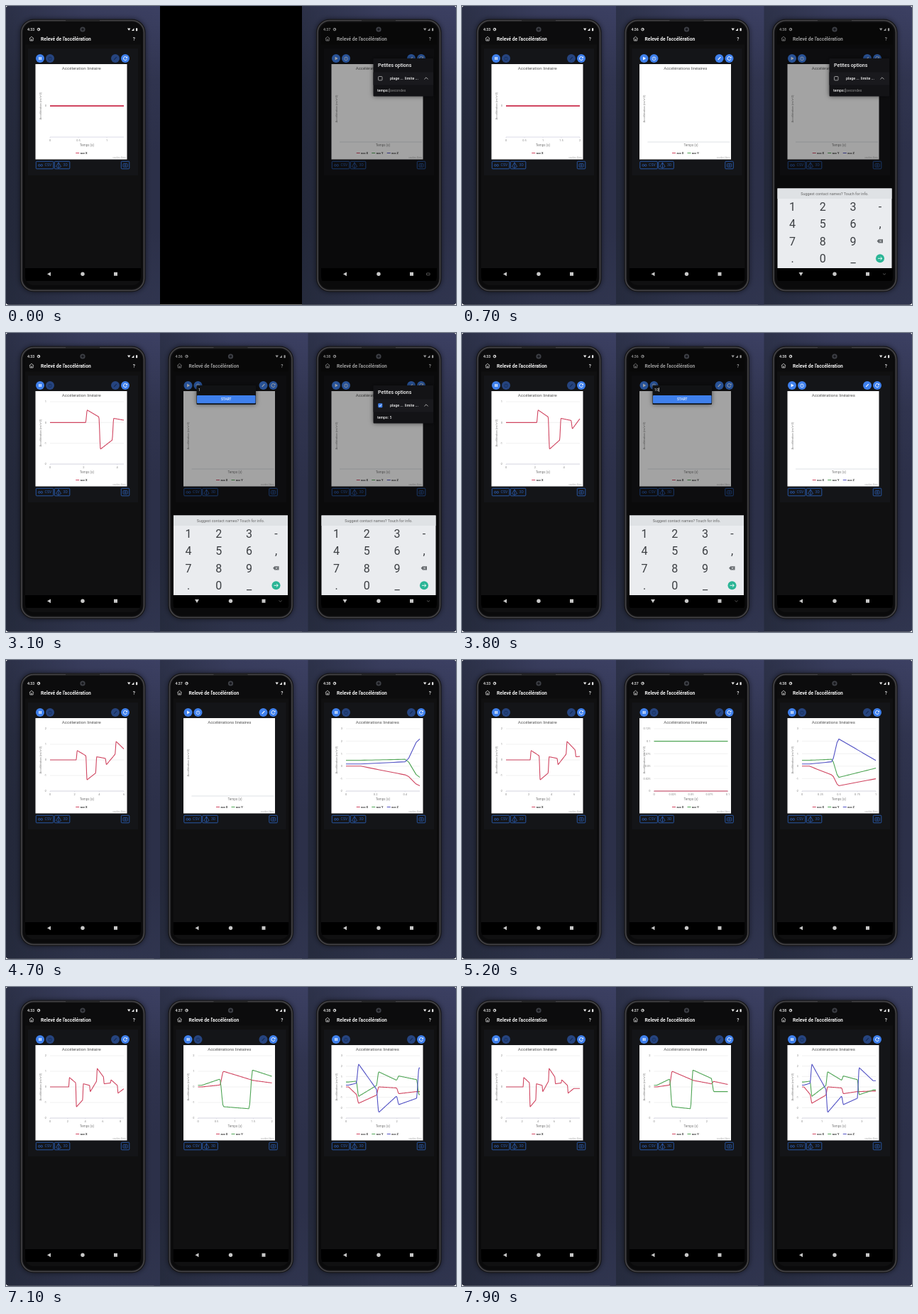
Write an HTML page with a canvas that moves like this. It is 634 by 422 pixels and loops after 8 s.

```html
<!DOCTYPE html>
<html lang="fr">
<head>
<meta charset="utf-8">
<title>Relevé de l'accélération</title>
<style>
html, body { margin: 0; width: 100%; height: 100%; overflow: hidden; background: #fff; }
canvas { display: block; width: 634px; height: 422px; }
</style>
</head>
<body>
<canvas id="stage"></canvas>
<script>
const W = 634, H = 422, LOOP = 8000, STEP = 100;
const FONT = 'Roboto, "Open Sans", sans-serif';
const RED = '#d04560', GREEN = '#4fa555', BLUE = '#5050c4', ACCENT = '#3f80ec';
const PLOT = { x: 62, y: 97, w: 104, h: 88 };
const BEAT = .79, JUMP = .1;
const dpr = window.devicePixelRatio || 1;
const canvas = document.getElementById('stage');
canvas.width = W * dpr;
canvas.height = H * dpr;
const g = canvas.getContext('2d');

// The phone is shaken once per beat: the value jumps to the first number, then drifts to the second
const axis = (name, color, first, ...swings) => ({ name, color, first, swings });
const solo = [
  axis('acc X', RED, 2.12, [0, 0], [.6, .27], [-1.28, -.85], [.2, .1], [-.3, .35], [1.18, .65], [.2, .25], [.45, .1], [-.4, -.1])
];
const duo = [
  axis('acc X', RED, .59, [0, .12], [1, .5], [.42, .2], [.35, .1]),
  axis('acc Y', GREEN, .59, [.1, .5], [-1.27, -1.4], [1.08, .55], [-.3, -.3])
];
const trio = [
  axis('acc X', RED, .4, [0, -.7], [-1.57, -.8], [0, -.1], [-.65, -.45], [-.45, -.4]),
  axis('acc Y', GREEN, .4, [.47, .55], [-.9, .12], [1.45, .65], [1.05, .7], [-.75, -.3]),
  axis('acc Z', BLUE, .4, [.17, .35], [2.18, -.2], [-2.45, -.9], [-1.7, -1.1], [1.85, .6])
];

const clamp = v => Math.max(0, Math.min(1, v));
const mix = (a, b, k) => a + (b - a) * k;
const smooth = k => k * k * (3 - 2 * k);

function valueAt({ first, swings }, u) {
  const i = Math.min(swings.length - 1, Math.max(0, Math.floor((u - first) / BEAT) + 1));
  const since = i ? u - first - (i - 1) * BEAT : u;
  const [from, to] = swings[i];
  if (since < JUMP) return i ? mix(swings[i - 1][1], from, smooth(since / JUMP)) : from;
  return mix(from, to, clamp((since - JUMP) / ((i ? BEAT : first) - JUMP)));
}

function recorded(series, u) {
  const out = [];
  for (let v = 0; v < u; v += .025) out.push([v, valueAt(series, v)]);
  out.push([u, valueAt(series, u)]);
  return out;
}

// Halve or double a decimal unit until about four steps fit
function niceStep(span) {
  const unit = span < .95 ? .1 : 1;
  return unit * 2 ** Math.ceil(Math.log2(span / unit / 4) - 1e-6);
}

function valueRange(lines) {
  const vals = lines.flat().map(p => p[1]);
  const min = Math.min(...vals), max = Math.max(...vals), span = max - min;
  if (!span) return { lo: -1, hi: 1, step: 1, flat: true };
  const step = span > 1.5 ? 1 : niceStep(span);
  const pad = span * .05;
  return {
    lo: min === 0 ? 0 : Math.floor((min - pad) / step) * step,
    hi: Math.ceil((max + pad) / step) * step, step
  };
}

function text(str, x, y, size, color, align = 'left', weight = 400) {
  g.font = `${weight} ${size}px ${FONT}`;
  g.textAlign = align;
  g.textBaseline = 'middle';
  g.fillStyle = color;
  g.fillText(str, x, y + size * .06);
}

function box(x, y, w, h, fill, r = 0, stroke, lw = 1) {
  g.beginPath();
  g.roundRect(x, y, w, h, r);
  if (fill) { g.fillStyle = fill; g.fill(); }
  if (stroke) { g.strokeStyle = stroke; g.lineWidth = lw; g.stroke(); }
}

function disc(x, y, r, fill) {
  g.beginPath();
  g.arc(x, y, r, 0, 7);
  g.fillStyle = fill;
  g.fill();
}

function trace(pts) {
  g.beginPath();
  for (let i = 0; i < pts.length; i += 2) g.lineTo(pts[i], pts[i + 1]);
}

function poly(pts, fill) {
  trace(pts);
  g.fillStyle = fill;
  g.fill();
}

function line(pts, color, lw = 1) {
  trace(pts);
  g.strokeStyle = color;
  g.lineWidth = lw;
  g.lineJoin = 'round';
  g.stroke();
}

function arc(x, y, r, from, to, color, lw = .8) {
  g.beginPath();
  g.arc(x, y, r, from, to);
  g.strokeStyle = color;
  g.lineWidth = lw;
  g.stroke();
}

const label = v => String(+v.toFixed(3));

function chart(series, u) {
  box(41.5, 82, 129, 134.5, '#fff');
  const plural = series.length > 1;
  text(plural ? 'Accélérations linéaires' : 'Accéleration linéaire', 106.3, 88.3, 6.1, '#555', 'center');
  const { x, y, w, h } = PLOT, base = y + h;
  g.save();
  g.translate(48.5, u > 0 ? 141 : 145);
  g.rotate(-Math.PI / 2);
  text('Accélération (m/s^2)', 0, 0, 4.2, '#777', 'center');
  g.restore();
  text('Temps (s)', 114, 196.5, 4.5, '#777', 'center');

  if (u > 0) {
    const lines = series.map(s => recorded(s, u));
    const r = valueRange(lines);
    const py = v => base - (v - r.lo) / (r.hi - r.lo) * h;
    for (let i = 0, n = Math.round((r.hi - r.lo) / r.step); i <= n; i++) {
      const v = r.lo + i * r.step;
      if (r.flat && i !== 1) continue;
      line([x, py(v), x + w, py(v)], '#e8e8e8', .6);
      text(label(v), x - 5, py(v), 4, '#888', 'right');
    }
    line([x, base, x + w, base], '#ccd', .7);
    const step = Math.min(2, niceStep(u));
    for (let v = 0; v <= u + 1e-6; v += step) {
      const tx = x + v / u * w;
      line([tx, base, tx, base + 1.5], '#ccd', .5);
      text(label(v), tx, 190, 4, '#888', 'center');
    }
    lines.forEach((pts, i) =>
      line(pts.flatMap(([s, v]) => [x + s / u * w, py(v)]), series[i].color, r.flat ? 1.8 : 1.1));
  } else {
    line([53, 192, 169, 192], '#d0d4dc', .7);
  }

  let lx = 107 - (21.5 * series.length - 4) / 2;
  for (const s of series) {
    line([lx, 207.5, lx + 5, 207.5], s.color, 1.2);
    text(s.name, lx + 6.5, 207.5, 4, '#333', 'left', 700);
    lx += 21.5;
  }
  text('courbes libres', 169, 213.6, 3, '#aaa', 'right');
}

function toolbar(running) {
  const dim = '#26447f', ink = running ? '#142a54' : '#fff';
  [48, 62, 154, 168].forEach((x, i) =>
    disc(x, 74, 6, running && i % 3 ? dim : ACCENT));
  if (running) {
    box(46.3, 72, 1.3, 4, '#fff');
    box(48.6, 72, 1.3, 4, '#fff');
  } else {
    poly([46.6, 71.6, 50.6, 74, 46.6, 76.4], '#fff');
  }
  arc(62, 74.3, 2.4, 0, 7, ink, .7);
  line([62, 74.5, 62, 72.5], ink, .6);
  line([152.2, 75.8, 155.8, 72.2], ink, 1.2);
  arc(168, 74, 2.5, .3, 5.4, '#fff', .9);
  poly([168.6, 73.4, 171, 73.4, 171, 71], '#fff');
}

function exportRow() {
  const c = '#2b5eb4';
  box(42.3, 219.3, 24.5, 10.5, null, 1, c, .9);
  box(68.3, 219.3, 21.5, 10.5, null, 1, c, .9);
  box(162.3, 219.3, 11.5, 10.5, null, 1, c, .9);
  arc(46.8, 224.8, 1.4, 0, 7, c);
  arc(50.2, 224.8, 1.4, 0, 7, c);
  text('CSV', 54.5, 224.5, 5.2, c);
  line([74, 220.8, 77.6, 226.6, 74, 228.6, 70.4, 226.6, 74, 220.8], c, .8);
  line([74, 221, 74, 228], c, .8);
  text('3D', 80.5, 224.5, 5.2, c);
  box(165, 222.6, 6.2, 4.6, null, .8, c, .8);
  arc(168.1, 224.9, 1.1, 0, 7, c, .7);
}

function header(clock) {
  box(27, 24, 163, 30.5, '#0c0c0d');
  text(clock, 30, 33, 5.2, '#eee', 'left', 500);
  arc(46, 33, 1.8, 0, 7, '#ddd', 1);
  disc(46.6, 32.6, .9, '#ddd');
  poly([171, 31.5, 175.4, 31.5, 173.2, 34.8], '#eee');
  poly([177, 35, 180.4, 35, 180.4, 31.2], '#eee');
  box(183, 31.2, 2.2, 4, '#eee', .4);
  line([32.8, 46, 36, 43.2, 39.2, 46], '#ccc', .8);
  line([33.8, 45.4, 33.8, 49, 38.2, 49, 38.2, 45.4], '#ccc', .8);
  box(35.4, 46.6, 1.2, 2.2, '#ccc');
  text("Relevé de l'accélération", 49, 46.5, 6.7, '#f2f2f2', 'left', 700);
  text('?', 180.3, 46.5, 6.5, '#eee', 'center', 500);
}

function navBar(keys, typing) {
  box(27, 370, 163, 18, '#000');
  if (keys) poly([57.5, 376, 63.5, 376, 60.5, 381], '#c8c8c8');
  else poly([58, 378.3, 63, 375.4, 63, 381.2], '#c8c8c8');
  disc(108, 378.3, 2.7, '#c8c8c8');
  box(152, 375.8, 5, 5, '#c8c8c8');
  if (typing) {
    if (keys) line([176, 377.5, 178, 379.3, 180, 377.5], '#777', .7);
    else box(175.5, 377, 4.6, 2.8, null, .4, '#777', .7);
  }
}

function keyboard(ready) {
  box(27.5, 257.5, 161, 113, ready ? '#eaecef' : '#343434');
  if (!ready) return;
  box(27.5, 257.5, 161, 14.5, '#dfe2e5');
  text('Suggest contact names? Touch for info.', 108, 265, 5.4, '#666', 'center');
  ['123-', '456,', '789', '.0_'].forEach((row, j) =>
    [...row].forEach((ch, i) =>
      text(ch, Math.min(172, 48.5 + i * 42.8), 283 + j * 24.6, 16, '#3c3f43', 'center')));
  poly([167.6, 331.8, 170, 329.2, 176, 329.2, 176, 334.4, 170, 334.4], '#666a6e');
  line([171.2, 330.5, 174, 333.1], '#eaecef', .7);
  line([174, 330.5, 171.2, 333.1], '#eaecef', .7);
  disc(172, 356.3, 6, '#2bb596');
  line([169, 356.3, 174.6, 356.3], '#fff', .9);
  line([172.6, 354.2, 174.8, 356.3, 172.6, 358.4], '#fff', .9);
}

function shadowed(draw, blur = 6) {
  g.save();
  g.shadowColor = 'rgba(0,0,0,.55)';
  g.shadowBlur = blur * dpr;
  draw();
  g.restore();
}

function timerDialog(value, cursor) {
  shadowed(() => box(60, 74, 83.5, 27, '#111214', 1));
  if (value) text(value, 62.5, 80, 5.2, '#eee');
  else text('secondes', 63.3, 80, 5.2, '#8a8a8a');
  if (cursor) box(62 + (value ? 6.8 : 0), 77, .7, 6, '#ddd');
  box(60.5, 88, 82.5, 11.3, ACCENT, 1);
  text('START', 101.7, 93.7, 4.8, '#e8f0ff', 'center', 500);
}

function optionsDialog(value, checked) {
  shadowed(() => box(100.5, 74, 84.5, 53.5, '#131316', 1));
  text('Petites options', 107, 84, 7, '#f4f4f4', 'left', 500);
  box(100.5, 93.5, 84.5, 18, '#19191d');
  if (checked) {
    box(107.3, 99.2, 6, 6, ACCENT, 1);
    line([108.6, 102.3, 109.8, 103.6, 112, 100.8], '#fff', .9);
  } else {
    box(107.6, 99.5, 5.4, 5.4, null, .8, '#aaa', .9);
  }
  text('plage ...', 124, 102, 5.3, '#eee', 'left', 500);
  text('limite ...', 145, 102, 5.3, '#eee', 'left', 500);
  line([172.4, 103.4, 175, 100.8, 177.6, 103.4], '#ccc', .8);
  text('temps:', 106, 119.3, 5.2, '#eee', 'left', 500);
  if (value) text(value, 123.5, 119.3, 5.2, '#eee');
  else {
    box(122.8, 116.5, .6, 5.6, '#ccc');
    text('secondes', 124.2, 119.3, 5.2, '#8a8a8a');
  }
}

function blend(x, y, ...colors) {
  const grad = g.createLinearGradient(0, 0, x, y);
  colors.forEach((c, i) => grad.addColorStop(i / (colors.length - 1), c));
  return grad;
}

function backdrop() {
  box(0, 0, 217, 422, blend(0, 422, '#3c4063', '#30344f', '#2c3049', '#2c3049', '#30354f'));
  box(0, 0, 217, 422, blend(217, 0, 'rgba(24,30,38,.45)', 'rgba(24,30,38,.1)', 'rgba(24,30,38,0)'));
}

function body() {
  shadowed(() => box(20, 18.5, 176.5, 385, '#161618', 19), 7);
  box(22, 20.5, 172.5, 381, null, 17, '#454447', 1.6);
  box(24, 22.5, 168.5, 377, '#0a0a0b', 15);
  line([84, 21, 132, 21], '#1c1c1e', 1.4);
}

function phone(dx, p) {
  g.save();
  g.translate(dx, 0);
  backdrop();
  body();
  g.save();
  g.beginPath();
  g.roundRect(27, 24, 163, 370, 12);
  g.clip();
  box(27, 24, 163, 370, '#101011');
  header(p.clock);
  box(31, 60, 155, 179, '#141518');
  toolbar(p.running);
  chart(p.series, p.u);
  exportRow();
  if (p.dialog) {
    box(27, 24, 163, 370, 'rgba(0,0,0,.36)');
    p.dialog();
  }
  if (p.keys) keyboard(p.keys === 'ready');
  navBar(p.keys === 'ready', p.typing);
  g.restore();
  disc(108, 33, 3.6, '#3e4046');
  disc(108, 33, 1.8, '#17181d');
  g.restore();
}

function draw(t) {
  g.setTransform(dpr, 0, 0, dpr, 0, 0);
  g.fillStyle = '#fff';
  g.fillRect(0, 0, W, H);
  g.save();
  g.beginPath();
  g.roundRect(0, 0, W, 421.5, 4);
  g.clip();
  box(0, 0, W, H, '#000');
  const s = t / 1000;
  const within = (a, b) => t >= a && t < b;

  const options = t < 3500;
  phone(417, {
    clock: t < 400 ? '4:37' : '4:38', series: trio, u: s - 4.2, running: t >= 4200,
    dialog: options && (() => optionsDialog(t >= 2300 ? '5' : '', t >= 2600)),
    keys: within(200, 300) ? 'opening' : within(300, 3500) && 'ready',
    typing: options
  });

  if (t >= STEP) {
    const value = t < 2800 ? '' : t < 3400 ? '1' : '10';
    const asking = within(1400, 4300);
    phone(208.5, {
      clock: t < 4400 ? '4:36' : '4:37', series: duo, u: s - 5.1, running: t >= 5100,
      dialog: asking && (() => timerDialog(value, Math.floor(t / 500) % 2)),
      keys: within(1500, 1700) ? 'opening' : within(1700, 4300) && 'ready',
      typing: asking
    });
  }

  phone(0, { clock: '4:33', series: solo, u: s + 1.3, running: true });
  g.restore();
}

const start = performance.now();
function tick() {
  const t = (performance.now() - start) % LOOP;
  draw(Math.floor(t / STEP) * STEP);
  requestAnimationFrame(tick);
}
tick();
</script>
</body>
</html>
```
